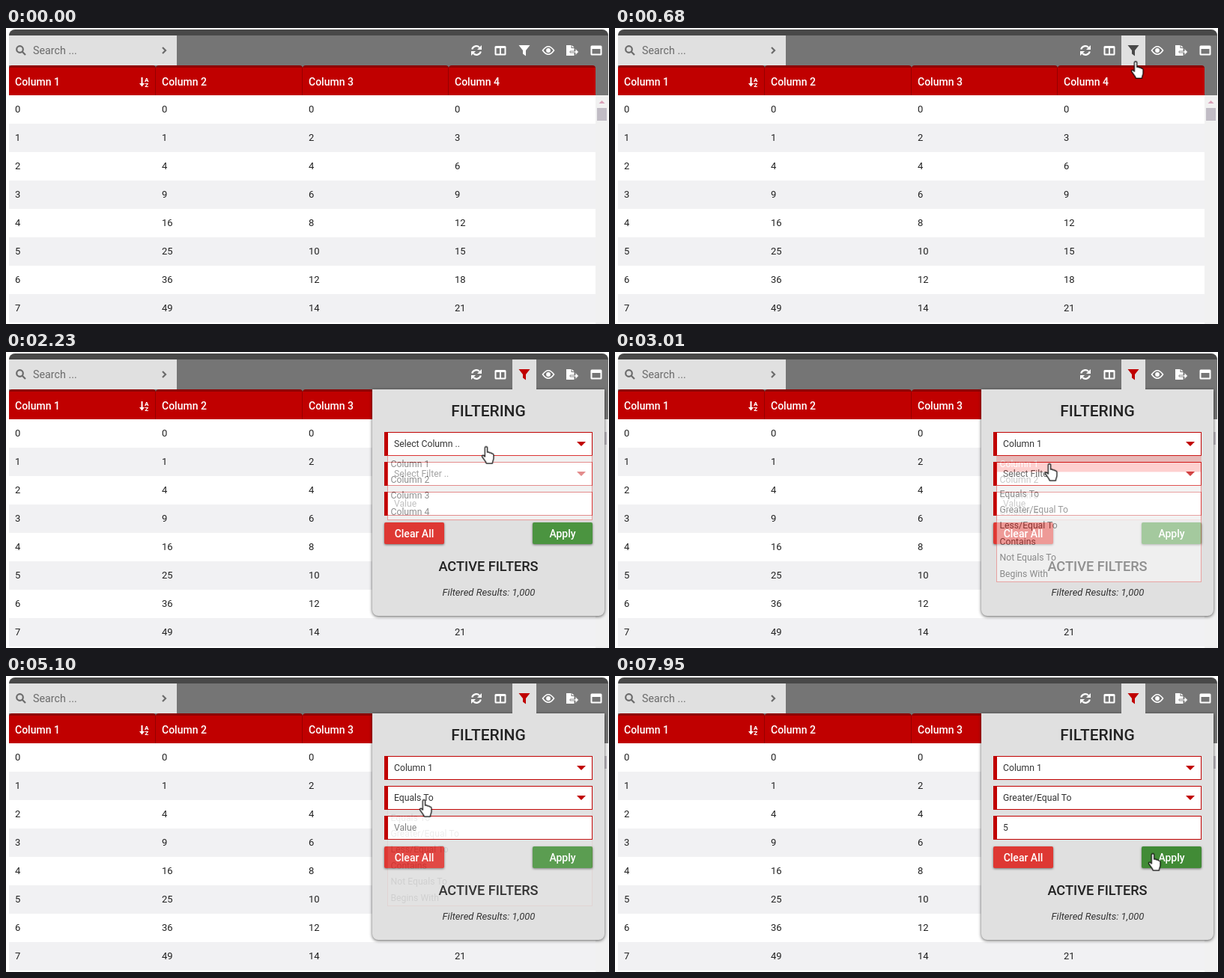
Write an HTML page that moves like this. It is 805x396 px and loops after 8000 ms.

```html
<!DOCTYPE html>
<html lang="en">
<head>
<meta charset="utf-8">
<title>Grid filtering</title>
<style>
html, body { margin: 0; width: 100%; height: 100%; overflow: hidden; background: #fff; }
svg { display: block; width: 100%; height: 100%; font: 12.2px Roboto, sans-serif; }
.medium { font-weight: 500; font-size: 14px; }
.cell { font-size: 13px; fill: #212121; }
.ink { fill: #333; }
.middle { text-anchor: middle; }
.title { font-weight: 500; fill: #222; text-anchor: middle; }
.field { fill: #fff; stroke: #c00000; }
.red { fill: #c00000; }
.hint { fill: #757575; }
.list { opacity: 0; }
.list > rect { fill: #fff; stroke: #f0625f; }
.hot { opacity: 0; fill: #fff; }
.hot rect { fill: #f9514e; }
.button { filter: drop-shadow(0 1px 1.5px rgba(0,0,0,.5)); }
.sheet { fill: #e0e0e0; filter: drop-shadow(0 1px 2px rgba(0,0,0,.65)); }
.late { opacity: 0; }
.pointer path { fill: #fff; stroke: #000; stroke-width: 1.2; stroke-linejoin: round; }
.pointer > * { opacity: 0; }

/* Timeline: 1% = 80 ms */
#panel { animation: panel 8s linear infinite; }
#columns { animation: columns 8s linear infinite; }
#filters { animation: filters 8s linear infinite; }
#pointer { animation: travel 8s linear infinite; }
.step { animation: 8s step-end infinite; }
#hoverBox { animation-name: hoverBox; }
#funnel { animation-name: funnel; }
#column0 { animation-name: column0; }
#column1 { animation-name: column1; }
#filter0 { animation-name: filter0; }
#filter1 { animation-name: filter1; }
#filter2 { animation-name: filter2; }
#value0 { animation-name: value0; }
#value1 { animation-name: value1; }
#caret0 { animation-name: caret0; }
#caret1 { animation-name: caret1; }
#columns .hot0 { animation-name: hotColumn; }
#filters .hot0 { animation-name: hotEquals; }
#filters .hot1 { animation-name: hotGreater; }
#apply { animation-name: apply; }
#arrow { animation-name: arrow; }
#hand { animation-name: hand; }
#beam { animation-name: beam; }

@keyframes panel {
  0%, 13.3% { opacity: 0; transform: translateY(-12px); animation-timing-function: ease-out; }
  18.5%, 100% { opacity: 1; transform: none; }
}
@keyframes columns {
  0%, 25.8% { opacity: 0; } 29.6%, 35.6% { opacity: 1; } 38.4%, 100% { opacity: 0; }
}
@keyframes filters {
  0%, 35.7% { opacity: 0; } 39.6%, 53% { opacity: 1; } 57%, 63.4% { opacity: 0; }
  67.4%, 79.7% { opacity: 1; } 83.8%, 100% { opacity: 0; }
}
@keyframes travel {
  0%, .8% { transform: translate(697px, 278px); }
  4% { transform: translate(692px, 190px); }
  6% { transform: translate(690px, 122px); }
  8.4% { transform: translate(695px, 45px); }
  10.5% { transform: translate(696px, 29px); }
  11.5%, 18% { transform: translate(696px, 28px); animation-timing-function: ease-in-out; }
  23.8%, 28.5% { transform: translate(641px, 126px); animation-timing-function: ease-in-out; }
  33.6%, 38.5% { transform: translate(580px, 149px); }
  45.3% { transform: translate(559px, 184px); }
  49%, 60% { transform: translate(559px, 191px); }
  63.2%, 65% { transform: translate(558px, 165px); }
  69.5% { transform: translate(562px, 183px); }
  74.3%, 95.6% { transform: translate(571px, 206px); }
  99.3%, 100% { transform: translate(718px, 237px); }
}
@keyframes hoverBox { 8.2%, to { opacity: 1; } }
@keyframes funnel { 8.2% { fill: #484848; } 13.3%, to { fill: #c00000; } }
@keyframes column0 { 35.6%, to { opacity: 0; } }
@keyframes column1 { 35.6%, to { opacity: 1; } }
@keyframes filter0 { 53%, to { opacity: 0; } }
@keyframes filter1 { 53% { opacity: 1; } 79.7%, to { opacity: 0; } }
@keyframes filter2 { 79.7%, to { opacity: 1; } }
@keyframes value0 { 91.7%, to { opacity: 0; } }
@keyframes value1 { 91.7%, to { opacity: 1; } }
@keyframes caret0 { 86.7% { opacity: 1; } 91.7%, to { opacity: 0; } }
@keyframes caret1 { 91.7% { opacity: 1; } 96.4%, to { opacity: 0; } }
@keyframes hotColumn { 31.2%, to { opacity: 1; } }
@keyframes hotEquals {
  44.3% { opacity: 1; } 61% { opacity: 0; } 68.6% { opacity: 1; } 73.1%, to { opacity: 0; }
}
@keyframes hotGreater { 73.1%, to { opacity: 1; } }
@keyframes apply { 98.8%, to { fill: #418b36; } }
@keyframes arrow {
  .8% { opacity: 1; } 8.2% { opacity: 0; } 18.8% { opacity: 1; } 22.2% { opacity: 0; }
  96.4% { opacity: 1; } 98.8%, to { opacity: 0; }
}
@keyframes hand {
  8.2% { opacity: 1; } 18.8% { opacity: 0; } 22.2% { opacity: 1; } 57% { opacity: 0; }
  61.5% { opacity: 1; } 83.8% { opacity: 0; } 98.8%, to { opacity: 1; }
}
@keyframes beam {
  57% { opacity: 1; } 61.5% { opacity: 0; } 83.8% { opacity: 1; } 96.4%, to { opacity: 0; }
}
</style>
</head>
<body>
<svg viewBox="0 0 805 396">
  <path d="M4 90V10a8 8 0 0 1 8-8H796a8 8 0 0 1 8 8V90z" fill="#484848"/>
  <rect x="4" y="10" width="800" height="80" fill="#757575"/>
  <g id="grid"></g>

  <rect x="787" y="90" width="17" height="306" fill="#f1f1f1"/>
  <rect x="789" y="107" width="13" height="17" fill="#c1bcc5"/>
  <path d="M791.500 101 795.500 97 799.500 101z" fill="#d8a0b8"/>

  <g id="panel">
    <path class="sheet" d="M489 50H799V345a8 8 0 0 1-8 8H497a8 8 0 0 1-8-8z"/>
    <text class="title" x="644" y="86" font-size="21">FILTERING</text>
    <g id="fields"></g>
    <g class="ink">
      <text id="column0" class="step" x="518" y="127">Select Column ..</text>
      <text id="column1" class="step late" x="518" y="127">Column 1</text>
      <text id="filter0" class="step" x="518" y="167">Select Filter ..</text>
      <text id="filter1" class="step late" x="518" y="167">Equals To</text>
      <text id="filter2" class="step late" x="518" y="167">Greater/Equal To</text>
      <text id="value0" class="step hint" x="518" y="207">Value</text>
      <text id="value1" class="step late" x="518" y="207">5</text>
      <rect id="caret0" class="step late" x="518" y="195" width="1" height="15"/>
      <rect id="caret1" class="step late" x="525" y="195" width="1" height="15"/>
    </g>
    <path class="red" d="M762 120h12l-6 6zM762 160h12l-6 6z"/>
    <g class="button">
      <rect x="505" y="228" width="80" height="29" rx="2" fill="#de3833"/>
      <rect id="apply" class="step" x="703" y="228" width="80" height="29" rx="2" fill="#4b9440"/>
    </g>
    <g class="medium middle" fill="#fff">
      <text x="545" y="248">Clear All</text>
      <text x="743" y="248">Apply</text>
    </g>
    <text class="title" x="644" y="293" font-size="18.2">ACTIVE FILTERS</text>
    <text class="ink middle" x="644.5" y="326" font-size="13" font-style="italic">Filtered Results: 1,000</text>
    <g id="columns" class="list"></g>
    <g id="filters" class="list"></g>
  </g>

  <rect x="4" y="10" width="224" height="40" fill="#e0e0e0"/>
  <g fill="none" stroke="#6b6b6b" stroke-width="2.200">
    <circle cx="18.500" cy="28.500" r="4.300"/>
    <path d="M21.500 31.500 26 36"/>
    <path d="M209 26l4 4-4 4"/>
  </g>
  <text x="36" y="35" font-size="14.3" fill="#6b6b6b">Search ...</text>

  <rect id="hoverBox" class="step late" x="676" y="10" width="32" height="40" fill="#e0e0e0"/>
  <g fill="#fff">
    <g transform="translate(628 30)">
      <g id="turn">
        <path d="M-5.800-1.500A5.800 5.800 0 0 1 4-4" fill="none" stroke="#fff" stroke-width="2.200"/>
        <path d="M7-7V-1H1z"/>
      </g>
      <use href="#turn" transform="rotate(180)"/>
    </g>
    <g transform="translate(660 30)">
      <rect x="-7.500" y="-6" width="15" height="12.500" rx="1.500"/>
      <path d="M-5.500-3h4.500v7.500h-4.500zM1-3h4.500v7.500h-4.500z" fill="#757575"/>
    </g>
    <path id="funnel" class="step" transform="translate(692 30)" d="M-7.500-7H7.500L2 0V7.500L-2 4.500V0z"/>
    <g transform="translate(724 30)">
      <path d="M-7.500 0Q0-10.500 7.500 0Q0 10.500-7.500 0z" fill="none" stroke="#fff" stroke-width="1.600"/>
      <circle r="2.900"/>
    </g>
    <g transform="translate(756 30)">
      <path d="M-8-7H-1.500V-3H2.500V7H-8zM-.5-7 2.500-4H-.5z"/>
      <path d="M-3 1H4V-2.500L8.500 2 4 6.500V3H-3z" stroke="#757575" stroke-width=".8"/>
    </g>
    <g transform="translate(788 30)">
      <rect x="-7.500" y="-6.500" width="15" height="13" rx="1.500"/>
      <rect x="-5.500" y="-2" width="11" height="6.500" fill="#757575"/>
    </g>
  </g>

  <g id="pointer" class="pointer">
    <path id="arrow" class="step" d="M0 0V16l3.700-3.500 2.400 5.600 2.400-1-2.400-5.500H11z"/>
    <path id="hand" class="step" transform="translate(-6.700 -.3)" d="M5 2.500a1.700 1.700 0 0 1 3.400 0V8.500c1-.7 2.600-.4 3 .7 1-.5 2.400-.1 2.700 1 1.200-.4 2.600.3 2.600 1.900v4.400c0 2.500-1.600 3.500-1.600 6.800H7c-.5-2.800-4-5.800-5.600-8.900-.8-1.600 1-2.800 2.300-1.500L5 14.300z"/>
    <path id="beam" class="step" style="fill:none;stroke-width:1" d="M-3-7.500h2.500l.5.5.5-.5H3M0-7V8M-3 8.500h2.500L0 8l.5.500H3"/>
  </g>
</svg>
<script>
const fill = (id, markup) => document.getElementById(id).innerHTML = markup;
const range = (count, draw) => Array.from({ length: count }, (_, i) => draw(i)).join('');
const rect = (x, y, w, h, attrs) => `<rect x="${x}" y="${y}" width="${w}" height="${h}" ${attrs}/>`;
const text = (x, y, label, attrs = '') => `<text x="${x}" y="${y}" ${attrs}>${label}</text>`;

const edges = [4, 200, 396, 591, 787];
const headings = range(4, c => {
  const x = edges[c], w = edges[c + 1] - x;
  return rect(x, 50, w, 12, 'rx="4" fill="#8e0000"') + rect(x, 53, w, 37, 'class="red"') +
    (c < 3 ? rect(x + w - 1, 53, 1, 37, 'fill="#960000"') : '') +
    text(x + 8, 77, `Column ${c + 1}`, 'class="medium" fill="#fff"');
});
const rows = range(8, n => {
  const y = 90 + n * 38;
  return rect(4, y, 783, 38, `fill="${n % 2 ? '#f1f1f3' : '#fff'}"`) +
    [n, n * n, 2 * n, 3 * n].map((v, c) => text(edges[c] + 8, y + 23, v, 'class="cell"')).join('');
});
const sortIcon = `<g fill="#fff"><path d="M180.500 66h2v8h2.500l-3.500 4.500-3.500-4.500h2.500z"/>
  <g font-size="8" font-weight="900">${text(185, 71.5, 'A')}${text(185.3, 78.5, 'Z')}</g></g>`;
fill('grid', headings + sortIcon + rows);

fill('fields', range(3, i => {
  const y = 107 + i * 40;
  return rect(505.5, y + .5, 277, 31, 'class="field"') + rect(505, y, 5, 32, 'class="red"');
}));

const step = 21.4;
function list(id, top, labels) {
  const option = (label, i) => text(513.5, top + 15.5 + i * step, label);
  fill(id, rect(509.5, top + .5, 273, labels.length * step + .5, '') +
    `<g class="ink">${labels.map(option).join('')}</g>` +
    range(2, i => `<g class="hot hot${i} step">${
      rect(510, top + 1 + i * step, 272, step, '')}${option(labels[i], i)}</g>`));
}
list('columns', 138, ['Column 1', 'Column 2', 'Column 3', 'Column 4']);
list('filters', 178, ['Equals To', 'Greater/Equal To', 'Less/Equal To', 'Contains', 'Not Equals To', 'Begins With']);
</script>
</body>
</html>
```
